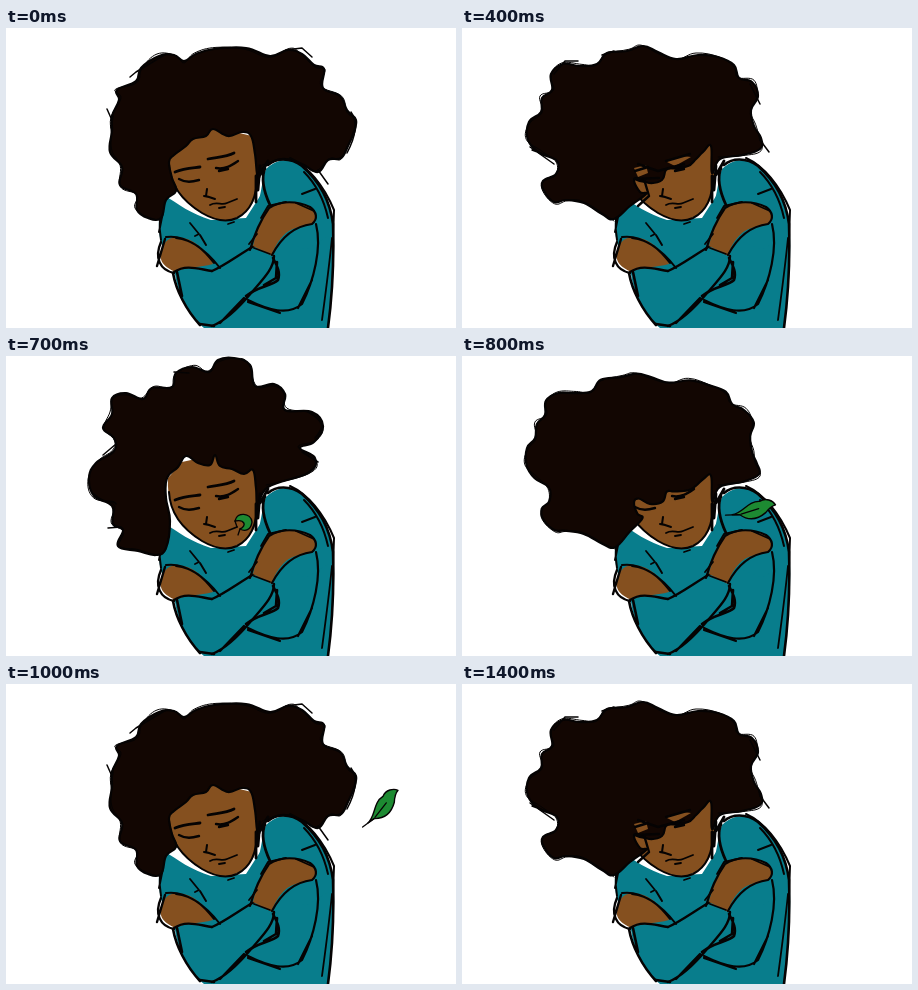
Write an HTML page with a canvas that moves like this. It is 450 px wide and 300 px high and loops after 1500 ms.

```html
<!DOCTYPE html>
<html lang="en">
<head>
<meta charset="utf-8">
<title>Windblown hair</title>
<style>
html, body { margin: 0; width: 100%; height: 100%; overflow: hidden; background: #fff; }
canvas { display: block; width: 100%; height: 100%; }
</style>
</head>
<body>
<canvas id="stage" width="450" height="300"></canvas>
<script>
const ctx = document.getElementById('stage').getContext('2d');
const INK = '#050303', HAIR = '#120602', SKIN = '#85501f', TEAL = '#087d8c', GREEN = '#1d8a32';
const STEP = 100, LOOP = 1500;
const OUTER = 36;

// Each pose: the outer edge from the left lock over the top, then the hairline back.
const points = s => s.trim().split(/\s+/).map(p => p.split(',').map(Number));

const right = points(`
  155,190 142,190 131,182 130,166 114,157 116,139 104,124 106,103 106,88 113,72 111,62 130,53
  135,40 153,28 168,27 178,33 190,26 208,21 240,20 264,28 282,22 296,26 308,37 318,41
  317,60 334,68 341,82 350,92 347,106 342,118 335,130 322,132 312,144 296,136 276,131 258,139
  252,150 249,126 245,108 236,104 222,108 207,101 200,108 187,111 180,118 168,127 163,134 166,150 170,163 160,172`);

const up = points(`
  160,192 150,199 132,195 112,190 117,174 107,168 106,150 88,140 83,122 90,107 108,95 108,82
  97,72 106,58 106,42 120,37 137,43 146,32 166,31 170,17 186,11 203,16 212,4 228,2
  244,9 249,30 268,28 279,38 279,54 306,56 317,70 308,86 294,92 309,102 302,117 262,131
  252,150 250,132 247,114 238,118 226,113 214,110 209,99 204,109 192,107 180,100 172,111 161,122 160,142 164,165`);

const left = points(`
  152,191 140,186 122,175 104,172 92,174 82,163 81,153 94,146 95,133 78,125 66,112 67,94
  79,84 80,70 90,62 89,46 101,36 118,38 135,36 145,25 165,23 181,18 196,24 214,31
  236,27 256,29 272,37 277,50 290,54 296,68 289,82 292,98 299,110 298,121 280,127 258,131
  250,145 249,118 241,124 233,132 226,138 212,140 204,142 200,152 187,155 176,150 172,153 178,164 184,166 168,178`);

const mix = (a, b, t, push = 0) => a.map(([x, y], i) => [
  x + (b[i][0] - x) * t - (i < OUTER ? push * Math.sin(Math.PI * i / OUTER) : 0),
  y + (b[i][1] - y) * t
]);

const poses = [
  { hair: right, marks: 'M124 49L130 44L160 26M101 81L105 90M280 22L296 20L306 29M312 142L322 156M345 84C352 94 350 108 341 125M105 100L107 88' },
  { hair: mix(right, up, .5), marks: '' },
  { hair: up, marks: 'M102 172L115 171M168 16L183 17M296 96L312 106M88 138C100 150 106 142 110 148M302 56C320 66 318 72 309 82M97 99L110 88' },
  { hair: mix(up, left, .85, 10), marks: '' },
  { hair: left, marks: 'M68 119L92 136M70 122L86 128M92 46L103 33L116 33M288 56L298 76M298 112L307 124M140 27L152 23', low: true }
];

// Leaf position and turn for the steps it is on stage.
const leaf = {
  5: [46, 283, -.2], 6: [138, 225, .3], 7: [237, 166, 0, true],
  8: [290, 153, .4], 9: [335, 147, 0], 10: [375, 123, -.2]
};

function fill(d, color) {
  ctx.fillStyle = color;
  ctx.fill(new Path2D(d));
}

function ink(d, width = 2) {
  ctx.strokeStyle = INK;
  ctx.lineWidth = width;
  ctx.stroke(new Path2D(d));
}

function spline(p, close) {
  const n = p.length;
  const at = i => close ? p[(i + n) % n] : p[Math.max(0, Math.min(n - 1, i))];
  let d = `M${p[0]}`;
  for (let i = 0; i < (close ? n : n - 1); i++) {
    const [a, b, c, e] = [at(i - 1), at(i), at(i + 1), at(i + 2)];
    const k = j => [b[j] + (c[j] - a[j]) / 5, c[j] - (e[j] - b[j]) / 5, c[j]];
    const [x, y] = [k(0), k(1)];
    d += `C${x[0]} ${y[0]} ${x[1]} ${y[1]} ${x[2]} ${y[2]}`;
  }
  return d + (close ? 'Z' : '');
}

function drawTorso() {
  fill('M158 167C172 176 185 186 205 192L240 190L256 165L262 140C272 130 288 129 300 141C316 158 327 178 328 205C329 240 326 270 322 300L198 300C184 288 172 268 169 246L155 215C151 198 153 180 158 167Z', TEAL);
  ink('M160 168C154 182 152 196 155 212M157 184L153 204');
}

function drawFace() {
  const face = 'M162 122C161 142 166 158 177 170C187 182 204 191 219 193C233 191 245 182 250 168C254 150 252 125 246 108L208 99L176 106Z';
  fill(face, SKIN);
  ink('M163 136C164 158 178 174 196 185C208 192 220 195 231 190C243 184 251 172 251 148');
  ink('M169 144C178 140 186 140 194 139M202 131C212 129 220 129 228 125', 2.8);
  ink('M173 151C180 155 186 154 193 152M210 140C219 142 226 137 232 133M213 143L222 141', 2.4);
  ink('M201 161L200 168L209 171M198 168L203 169');
  ink('M204 177C211 173 216 178 221 175L231 171M213 180L219 179', 1.8);
}

function drawHair({ hair, marks, low }) {
  const edge = hair.slice(0, OUTER);
  fill(spline(hair, true), HAIR);
  ink(spline(hair, true), 2.2);
  const loose = edge.map(([x, y], i) => [x + 2 * Math.sin(i * 2.3), y + 2 * Math.cos(i * 1.7)]);
  ink(spline(loose), 1);
  ink(marks, 1.5);
  if (low) {
    fill('M172 140L184 137L186 145L176 149Z', SKIN);
    fill('M203 133L220 128L229 129L213 138Z', SKIN);
    ink('M173 143L186 139M204 133L228 126M172 151L197 150M176 136L196 143L222 136M182 151L187 168L176 178', 2.4);
  }
}

function drawArms() {
  fill('M250 182C256 165 256 150 260 141C272 130 288 129 300 141C316 158 326 178 328 205L300 222L250 202Z', TEAL);
  ink('M262 137C270 130 284 129 296 138C312 152 324 172 327 196C328 228 327 262 322 300', 2.6);
  ink('M284 130C302 138 318 158 328 182L327 210M298 144C310 156 318 172 322 190M296 166L309 161');
  ink('M259 140C255 150 257 162 264 177M250 148L250 174M254 138L252 162M262 133L254 147', 2.8);
  ink('M184 195L193 206L189 208M222 196L228 194', 1.8);

  fill('M155 222C160 208 170 207 184 212C196 218 206 230 207 236C194 240 180 238 170 244C160 240 152 234 155 222Z', SKIN);
  ink('M160 209C180 206 200 222 214 240M170 210C188 212 198 222 208 235M194 207L200 217');
  ink('M155 214C148 230 154 242 168 245M159 211L151 238M168 244C180 236 192 241 206 243', 2.4);

  ink('M167 245C170 262 180 282 194 297M171 244L176 268M194 296L208 298', 2.6);
  ink('M206 243C218 238 234 226 248 218M206 298C222 292 236 276 246 264C258 250 268 240 268 228M214 295L238 270', 2.4);

  fill('M247 218C250 204 256 190 263 180C275 172 292 173 304 179C310 184 311 191 306 196C296 198 286 200 280 205C272 212 268 220 266 228Z', SKIN);
  ink('M244 222C249 204 256 190 263 180C275 172 292 173 304 179C311 184 312 191 306 196C290 198 276 208 266 227', 2.2);
  ink('M255 190L262 178L280 174M290 175L308 183M243 216L251 206M248 220L264 226', 1.8);

  ink('M310 196C316 220 308 252 296 276C282 288 262 282 242 272M306 252L292 280M242 274L274 285', 2.2);
  ink('M240 268C252 258 266 258 272 252C275 244 270 236 267 230M271 234L270 250L258 257', 2.6);
  ink('M326 210C323 240 320 262 316 292', 1.8);
}

function drawLeaf([x, y, turn, curled]) {
  const d = curled
    ? 'M-8 -1C-6 -11 8 -9 9 0C8 8 2 10 -3 7C4 4 2 -3 -8 -1Z'
    : 'M-16 13C-7 8 -7 -6 4 -10C8 -16 16 -16 20 -13C16 -10 15 -6 14 -2C8 10 0 12 -9 10Z';
  ctx.save();
  ctx.translate(x, y);
  ctx.rotate(turn);
  fill(d, GREEN);
  ink(d, 1.4);
  ink(curled ? 'M-3 7L-5 13M-8 -1L-6 5' : 'M-22 16L-9 10M-8 9L6 -3', 1.3);
  ctx.restore();
}

function draw(step) {
  ctx.fillStyle = '#fff';
  ctx.fillRect(0, 0, 450, 300);
  drawTorso();
  drawFace();
  drawHair(poses[step % poses.length]);
  drawArms();
  if (leaf[step]) drawLeaf(leaf[step]);
}

ctx.lineCap = ctx.lineJoin = 'round';
let shown = -1;
function tick() {
  const step = Math.floor(performance.now() % LOOP / STEP);
  if (step !== shown) draw(shown = step);
  requestAnimationFrame(tick);
}
tick();
</script>
</body>
</html>
```
